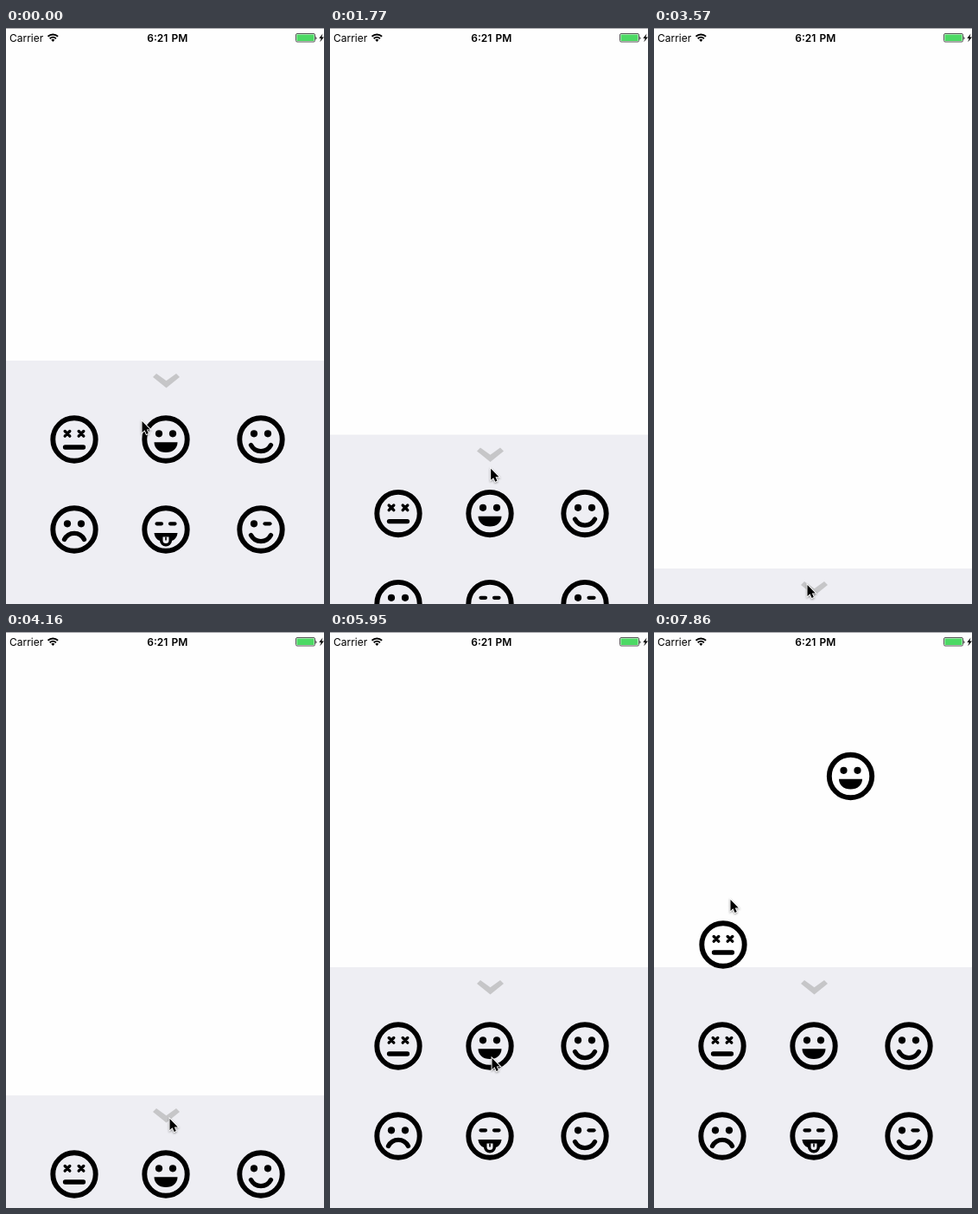
These frames come from a looping animation (368x665 px, 8 s). An HTML page:

```html
<!DOCTYPE html>
<html lang="en">
<head>
<meta charset="utf-8">
<title>Emoji drawer</title>
<style>
html, body { margin: 0; height: 100%; overflow: hidden; background: #fefefe; }
svg { display: block; width: 100vw; height: 100vh; }
text { font: 12px Inter, "Liberation Sans", sans-serif; }
.time { font-weight: 600; word-spacing: 1px; text-anchor: middle; }
.line { fill: none; stroke: #000; stroke-width: 5.3; stroke-linecap: round; }
.dash { stroke-width: 4.2; }
.cross { stroke-width: 3.4; }
.wifi { fill: none; stroke: #000; stroke-width: 1.9; }
#cursor { filter: drop-shadow(0 1px 1px #0006); }
</style>
</head>
<body>
<svg viewBox="0 0 368 665">
  <defs>
    <circle id="ring" r="24.7" fill="none" stroke="#000" stroke-width="5.9"/>
    <circle id="eye" r="4.1"/>
    <g id="eyes"><use href="#eye" x="-8" y="-6.7"/><use href="#eye" x="8" y="-6.7"/></g>
    <path id="smile" class="line" d="M-11.5 6.5C-6.5 16 6.5 16 11.5 6.5"/>
    <g id="dead">
      <use href="#ring"/>
      <path class="line cross" d="M-10.8-9.5l5.6 5.6m0-5.6l-5.6 5.6M5.200-9.500l5.600 5.600m0-5.600l-5.600 5.600"/>
      <path class="line" d="M-10.5 9H10.5"/>
    </g>
    <g id="grin">
      <use href="#ring"/><use href="#eyes"/>
      <path d="M-13.5 3.3H13.5C13.5 10.5 8 15 0 15S-13.5 10.5-13.5 3.3Z"/>
    </g>
    <g id="happy"><use href="#ring"/><use href="#eyes"/><use href="#smile"/></g>
    <g id="sad">
      <use href="#ring"/><use href="#eyes"/>
      <path class="line" d="M-11.5 11.5C-6.5 2 6.5 2 11.5 11.5"/>
    </g>
    <g id="tongue">
      <use href="#ring"/>
      <path class="line dash" d="M-10.5-6.7h5.5M5-6.7h5.5"/>
      <path d="M-13.5 4H13.5C13 9 10 12 7 13A7 6.5 0 0 1-7 13C-10 12-13 9-13.5 4Z"/>
      <path d="M-3.5 8.5H3.5V12.500a3.500 3.500 0 0 1-7 0Z" fill="#eeeef3"/>
      <path d="M0 8.500v4" stroke="#000" stroke-width="1.600"/>
    </g>
    <g id="wink">
      <use href="#ring"/><use href="#eye" x="-8" y="-6.7"/><use href="#smile"/>
      <path class="line dash" d="M4.5-6.7h6"/>
    </g>
  </defs>

  <rect width="368" height="665" fill="#fefefe"/>
  <rect width="368" height="1" fill="#a9a9ad"/>
  <text x="4" y="15.5">Carrier</text>
  <path class="wifi" d="M48.5 9.8a8.400 8.400 0 0 1 11.600 0M50.700 12.200a5.200 5.200 0 0 1 7.200 0"/>
  <path d="M54.3 16l-2-2.200a2.900 2.900 0 0 1 4 0Z"/>
  <text class="time" x="186.8" y="15.5">6:21 PM</text>
  <rect x="335.5" y="6.5" width="22" height="9.5" rx="1.5" fill="#fefefe" stroke="#555"/>
  <rect x="336.5" y="7.5" width="20" height="7.5" fill="#4cd964"/>
  <path d="M358.5 9.500q1.800 2 0 4Z"/>
  <path d="M366.5 6.500L362.300 12h2.400l-1.500 4.200L368 10.500h-2.700Z"/>

  <g id="panel">
    <rect width="368" height="300" fill="#eeeef3"/>
    <path d="M170 19L174 15 185.5 23.300 197 15 201 19 185.5 31.500Z" fill="#c6c6c8"/>
    <use href="#dead" x="79" y="91"/>
    <use href="#grin" x="185" y="91"/>
    <use href="#happy" x="295" y="91"/>
    <use href="#sad" x="79" y="195"/>
    <use href="#tongue" x="185" y="195"/>
    <use href="#wink" x="295" y="195"/>
  </g>
  <use id="dropGrin" href="#grin"/>
  <use id="dropDead" href="#dead" x="80" y="361"/>
  <g id="cursor">
    <path d="M.5 1V14L3.500 11.300 5.600 16 7.800 15 5.800 10.400H9.800Z" stroke="#fff" stroke-width="1.800" paint-order="stroke"/>
  </g>
</svg>
<script>
const LOOP = 8000, STEP = 147;
const PICK = 6250, DROP = 6830, SECOND_DROP = 7860;
const get = id => document.getElementById(id);
const glide = u => u * u * (3 - 2 * u);
const snap = u => 1 - (1 - u) ** 3.5;

// Key poses: when the move first and last shows, the value reached, the easing.
const panelMoves = [
  [1480, 2070, [516]], [2820, 2970, [624], snap],
  [3870, 4160, [535]], [4910, 4910, [511]], [5060, 5210, [387], snap]
];
const cursorMoves = [
  [150, 880, [185, 410]], [1480, 2070, [186, 561]], [2820, 2820, [195, 539]],
  [3270, 3570, [177, 642]], [3870, 4160, [189, 561]], [4910, 4910, [189, 537]],
  [5650, 5950, [187, 491]], [PICK, DROP, [229, 180]],
  [6980, 7410, [81, 480]], [SECOND_DROP, SECOND_DROP, [88, 308]]
];

function track(t, value, moves) {
  for (const [start, end, to, ease = glide] of moves) {
    if (t < start) break;
    const gaps = Math.round((end - start) / STEP);
    const shown = gaps ? Math.floor((t - start + 8) / (end - start) * gaps) : 0;
    const u = ease(Math.min(1, (shown + 1) / (gaps + 1)));
    value = value.map((v, i) => v + (to[i] - v) * u);
  }
  return value;
}

const cursorAt = t => track(t, [157, 453], cursorMoves);
const place = (id, x, y) => get(id).setAttribute('transform', `translate(${x} ${y})`);
const show = (id, on) => get(id).setAttribute('visibility', on ? 'visible' : 'hidden');

function draw(t) {
  place('panel', 0, track(t, [384], panelMoves)[0]);
  place('cursor', ...cursorAt(t));
  // The grin hangs on the cursor until it is dropped.
  const [x, y] = cursorAt(Math.min(t, DROP));
  place('dropGrin', x - 1.5, y - 13.5);
  show('dropGrin', t >= PICK);
  show('dropDead', t >= SECOND_DROP);
}

const begin = performance.now();
function frame() {
  draw((performance.now() - begin) % LOOP);
  requestAnimationFrame(frame);
}
frame();
</script>
</body>
</html>
```
